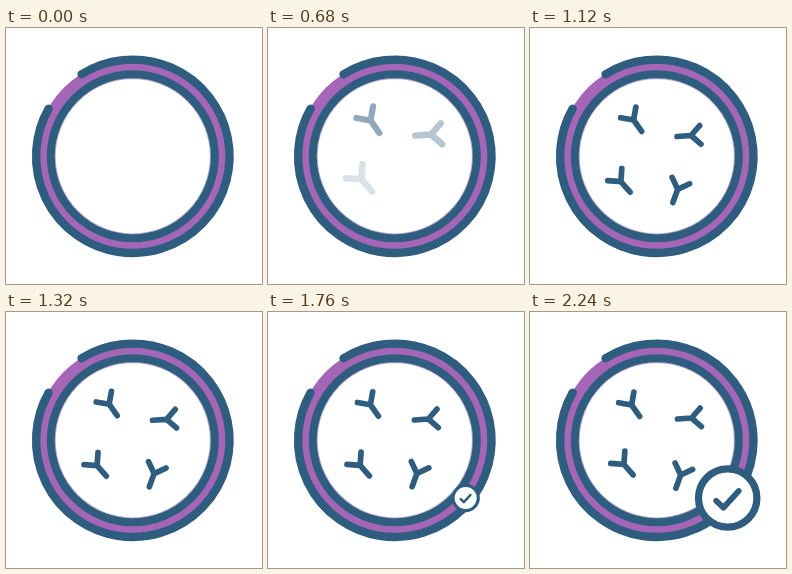
An HTML page that plays this animation: 256 px wide and 256 px high, repeating every 5000 ms.

```html
<!DOCTYPE html>
<html lang="en">
<head>
<meta charset="utf-8">
<title>Antibody check</title>
<style>
  html, body { margin: 0; width: 100%; height: 100%; overflow: hidden; background: #fff; }
  svg { display: block; width: 100vw; height: 100vh; }
  .line { fill: none; stroke: #2e5d80; stroke-linecap: round; stroke-linejoin: round; }
</style>
</head>
<body>
<svg viewBox="0 0 256 256">
  <g transform="translate(126.8 128.3)">
    <circle r="91" fill="none" stroke="#a666b7" stroke-width="12.5"/>
    <path id="rim" class="line" stroke-width="8.4"/>
    <circle r="77.7" fill="none" stroke="#b9abcb" stroke-width="1.2"/>
    <circle class="line" r="82" stroke-width="8"/>
  </g>
  <g id="cells"></g>
  <g id="badge">
    <circle class="line" r="29.2" stroke-width="7.2" style="fill:#fff"/>
    <path class="line" d="M-11.5 2.8L-4.3 9.7L11 -7" stroke-width="5.8"/>
  </g>
</svg>
<script>
const LOOP = 5000, STEP = 40;
const $ = id => document.getElementById(id);
const clamp = v => Math.min(1, Math.max(0, v));
const smooth = v => (v = clamp(v), v * v * (3 - 2 * v));
const mix = (a, b, k) => a + (b - a) * k;

// Open outer ring, drawn clockwise around the gap at upper left.
const RIM = 96.7;
const onRim = deg => {
  const a = (180 + deg) * Math.PI / 180;
  return `${RIM * Math.cos(a)} ${RIM * Math.sin(a)}`;
};
$('rim').setAttribute('d', `M${onRim(58)}A${RIM} ${RIM} 0 1 1 ${onRim(29.5)}`);

// Hub, stem direction, fade start, and drift offsets at the times in KEYS.
const KEYS = [840, 1120, 1560, 1960, 2160];
const cells = [
  { hub: [101.6, 93], angle: 55, start: 500,
    drift: [[1, -0.5], [2, -1], [1, -0.5], [0.6, 0], [0, 0]] },
  { hub: [161.5, 106], angle: 176, start: 560,
    drift: [[1.5, 0.5], [-0.5, 1.5], [-1.5, 1], [-0.8, 1], [0, 0]] },
  { hub: [93.9, 152.3], angle: 49, start: 620,
    drift: [[-0.5, -1], [-3, 1.3], [-2.5, 1.3], [-1, 0.7], [0, 0]] },
  { hub: [150.7, 163], angle: 110, start: 680,
    drift: [[-3, -3], [-3, -1.7], [-2, -1], [-1.6, -2], [0, 0]] }
];

for (const cell of cells) {
  cell.node = document.createElementNS('http://www.w3.org/2000/svg', 'path');
  cell.node.setAttribute('class', 'line');
  cell.node.setAttribute('stroke-width', 5.7);
  cell.node.setAttribute('d', 'M0 0H14M-9.3 -9.3L0 0L-9.3 9.3');
  $('cells').append(cell.node);
}

function driftAt(list, t) {
  if (t <= KEYS[0]) return list[0];
  const i = KEYS.findIndex(k => t < k);
  if (i < 0) return list[list.length - 1];
  const k = smooth((t - KEYS[i - 1]) / (KEYS[i] - KEYS[i - 1]));
  return list[i].map((v, n) => mix(list[i - 1][n], v, k));
}

function badgeScale(t) {
  const peak = 35 / 33;
  return t < 2120 ? peak * smooth((t - 1480) / 640)
                  : mix(peak, 1, smooth((t - 2120) / 120));
}

function draw(t) {
  for (const { node, hub, angle, start, drift } of cells) {
    const shown = t < 520 ? 0 : clamp((t - start) / 340);
    const [dx, dy] = driftAt(drift, t);
    node.setAttribute('opacity', shown);
    node.setAttribute('transform',
      `translate(${hub[0] + dx} ${hub[1] + dy}) rotate(${angle}) scale(${mix(1.2, 1, shown)})`);
  }
  const s = badgeScale(t);
  $('badge').setAttribute('display', s > 0.02 ? 'inline' : 'none');
  $('badge').setAttribute('transform', `translate(197.7 186) scale(${s})`);
}

const begin = performance.now();
function tick() {
  const t = (performance.now() - begin) % LOOP;
  draw(Math.floor(t / STEP) * STEP);
  requestAnimationFrame(tick);
}
tick();
</script>
</body>
</html>
```
